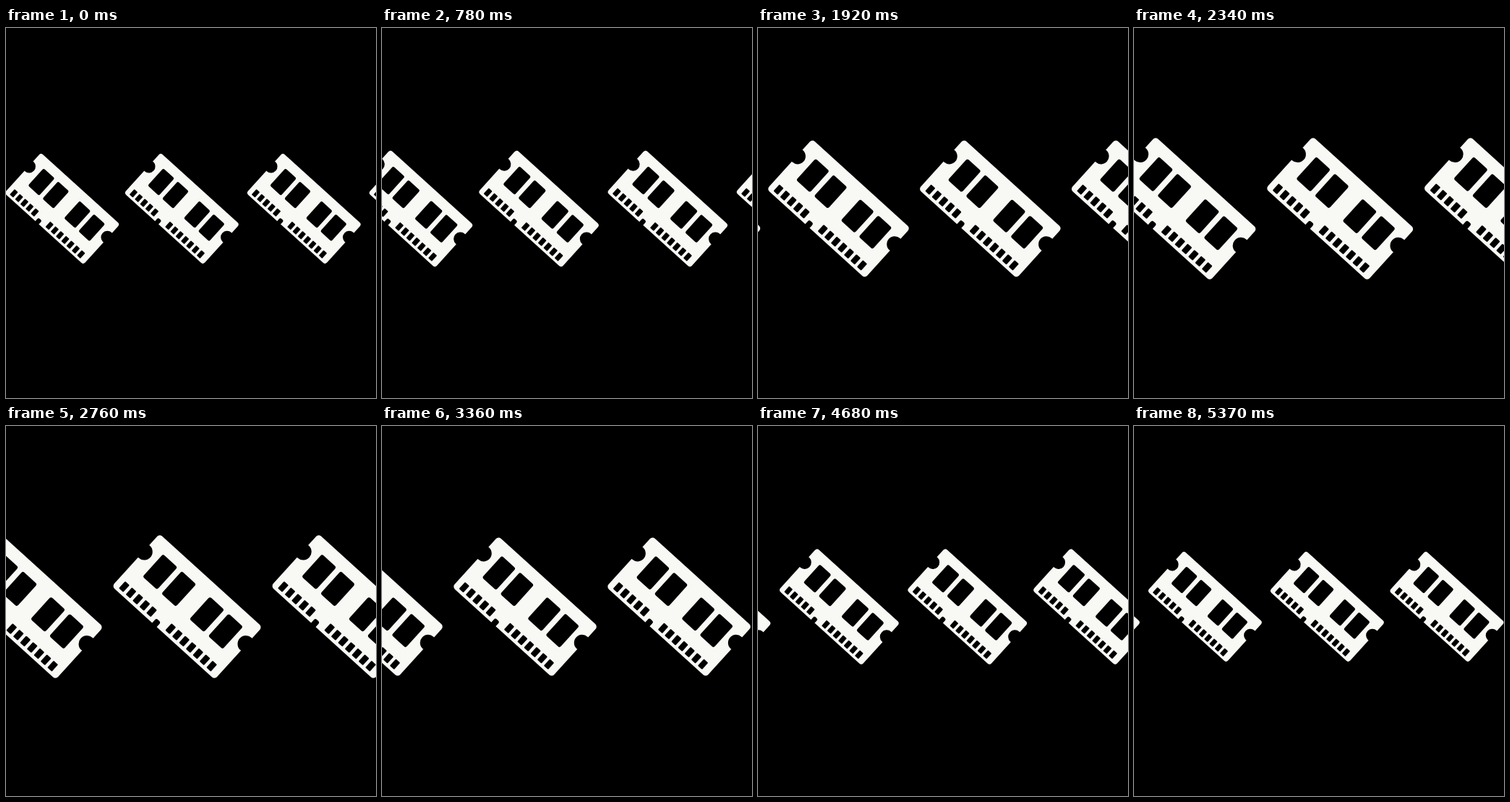
An HTML page with a canvas for the animation above (5400 ms loop, 512x512 px).

```html
<!DOCTYPE html>
<html>
<head>
<meta charset="utf-8">
<title>Memory modules</title>
<style>
html, body { margin: 0; width: 100%; height: 100%; overflow: hidden; background: #000; }
canvas { display: block; width: 512px; height: 512px; }
</style>
</head>
<body>
<canvas id="stage" width="512" height="512"></canvas>
<script>
const ctx = document.getElementById('stage').getContext('2d');
const LOOP = 5400, STEPS = 150;
const INK = '#f8f9f4', BACK = '#000';
const TILT = Math.atan2(0.672, 0.741);

// Rounded box given by its centre.
function box(path, x, y, w, h, r) {
  path.roundRect(x - w / 2, y - h / 2, w, h, r);
}

function disc(path, x, y, r) {
  path.moveTo(x + r, y);
  path.arc(x, y, r, 0, Math.PI * 2);
}

const body = new Path2D();
box(body, 0, 0, 192, 98, 5);

const holes = new Path2D();
for (const side of [-1, 1]) disc(holes, side * 95, -16.5, 11.5);
for (const x of [-60, -25, 27.5, 62.5]) box(holes, x, -10.5, 27, 42, 3);

// Contacts: five, a key notch, then seven.
const PIN = 12.8;
for (let i = 0; i < 5; i++) box(holes, -83 + i * PIN, 38, 8.3, 13, 1.2);
for (let i = 0; i < 7; i++) box(holes, 80.5 - i * PIN, 38, 8.3, 13, 1.2);
box(holes, -16.5, 46, 8.5, 11, 3);

function drawModule(x, scale) {
  ctx.save();
  ctx.translate(x, 250);
  ctx.scale(scale, scale);
  ctx.rotate(TILT);
  ctx.fillStyle = INK;
  ctx.fill(body);
  ctx.fillStyle = BACK;
  ctx.fill(holes);
  ctx.restore();
}

function draw(time) {
  const step = Math.floor((time % LOOP) / LOOP * STEPS);
  const pitch = 194.5 - 25.5 * Math.cos(2 * Math.PI * step / STEPS);
  const strip = pitch * 2.98;         // three modules, the last gap a little tighter
  const t = step / (STEPS - 1);
  const ease = t * t * (3 - 2 * t);
  const middle = 412.3 - 314 * ease;

  ctx.fillStyle = BACK;
  ctx.fillRect(0, 0, 512, 512);
  for (let copy = -1; copy <= 1; copy++) {
    for (let i = -1; i <= 1; i++) {
      drawModule(middle + copy * strip + i * pitch, pitch / 220);
    }
  }
}

const start = performance.now();
function tick() {
  draw(performance.now() - start);
  requestAnimationFrame(tick);
}
tick();
</script>
</body>
</html>
```
